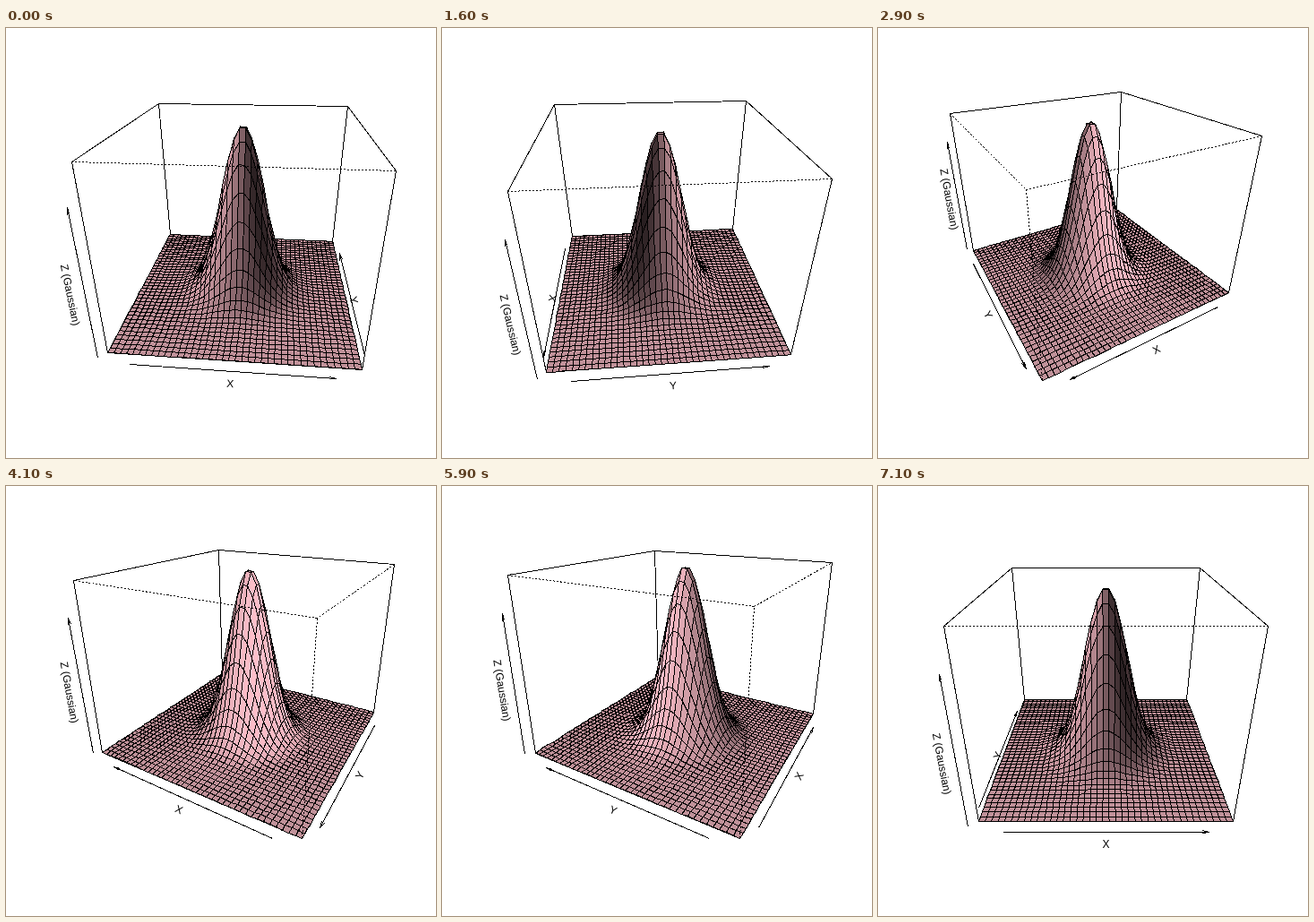
Recreate the animation shown at these times as an HTML page. Size 480 by 480 pixels, loop 7200 ms.

```html
<!DOCTYPE html>
<html lang="en">
<head>
<meta charset="utf-8">
<title>Rotating Gaussian surface</title>
<style>
  html, body { margin: 0; width: 100%; height: 100%; overflow: hidden; background: #fff; }
  svg { display: block; width: 480px; height: 480px; }
  #surface polygon, path { stroke: #000; stroke-width: 1; shape-rendering: crispEdges; }
  path { fill: none; }
  #front { stroke-dasharray: 2 2; }
  text { font: 12px "Liberation Sans", Arial, sans-serif; text-anchor: middle; }
</style>
</head>
<body>
<svg viewBox="0 0 480 480" xmlns="http://www.w3.org/2000/svg">
  <rect width="480" height="480" fill="#fff"/>
  <path id="back"/>
  <path id="axes"/>
  <g id="labels"><text dy="6">X</text><text dy="6">Y</text><text dy="6">Z (Gaussian)</text></g>
  <g id="surface"></g>
  <path id="front"/>
</svg>
<script>
const STEPS = 72, STEP_MS = 100;
const CELLS = 39, SIGMA = 0.2, EXPAND = 0.8, SHADE = 0.4;
const EYE = 2, DIST = Math.sqrt(3) + EYE;
const CENTER = [254.4, 232.8], ROOM = [361.8, 321.8];
const PINK = [255, 192, 203];
const AXIS_SPAN = [[-0.8, 0.8], [-0.8, 0.8], [-1, 0.6265]];
const ARROW_GAP = 0.06, LABEL_GAP = 0.12;
const HEAD = 7.2, HEAD_ANGLE = Math.PI / 18;

const $ = id => document.getElementById(id);
const texts = [...$("labels").children];
const rad = deg => deg * Math.PI / 180;

// Height field, scaled to -1..1
const pos = k => 2 * k / CELLS - 1;
const bell = (x, y) => Math.exp(-(x * x + y * y) / (2 * SIGMA * SIGMA));
const peak = bell(1 / CELLS, 1 / CELLS);
const height = [];
for (let i = 0; i <= CELLS; i++) {
  height.push([]);
  for (let j = 0; j <= CELLS; j++) height[i].push(2 * bell(pos(i), pos(j)) / peak - 1);
}

function facetColor(i, j) {
  const h = 2 / CELLS;
  const a = EXPAND * (height[i + 1][j] - height[i][j + 1]);
  const b = EXPAND * (height[i + 1][j + 1] - height[i][j]);
  const lit = Math.SQRT2 * a / Math.hypot(a + b, a - b, 2 * h);
  const s = Math.pow(Math.max(0, (lit + 1) / 2), SHADE);
  return `rgb(${PINK.map(c => Math.round(c * s))})`;
}

const facets = [];
for (let i = 0; i < CELLS; i++)
  for (let j = 0; j < CELLS; j++) {
    const el = document.createElementNS("http://www.w3.org/2000/svg", "polygon");
    $("surface").appendChild(el);
    facets.push({ i, j, fill: facetColor(i, j), depth: 0 });
  }
const polygons = [...$("surface").children];

const corners = [];
for (const x of [-1, 1]) for (const y of [-1, 1]) for (const z of [-1, 1]) corners.push([x, y, z]);

function makeView(theta, phi) {
  const st = Math.sin(theta), ct = Math.cos(theta);
  const sp = Math.sin(phi), cp = Math.cos(phi);
  const raw = ([x, y, z]) => {
    const across = x * ct + y * st, away = y * ct - x * st, up = z * EXPAND;
    const w = DIST - up * sp + away * cp;
    return [across / w, (up * cp + away * sp) / w];
  };
  const flat = corners.map(raw);
  const range = k => {
    const v = flat.map(p => p[k]);
    return [Math.min(...v), Math.max(...v)];
  };
  const [x0, x1] = range(0), [y0, y1] = range(1);
  const scale = Math.min(ROOM[0] / (x1 - x0), ROOM[1] / (y1 - y0));
  return {
    raw,
    depth: (x, y) => (y * ct - x * st) * cp,
    project: p => {
      const [x, y] = raw(p);
      return [CENTER[0] + scale * (x - (x0 + x1) / 2), CENTER[1] - scale * (y - (y0 + y1) / 2)];
    },
    camera: [DIST * st * cp, -DIST * ct * cp, DIST * sp / EXPAND]
  };
}

const snap = p => p.map(v => Math.floor(v) + 0.5);
const line = (...pts) => "M" + pts.map(p => snap(p).join(" ")).join("L");

function drawBox(view) {
  const faces = (axis, side) => side * view.camera[axis] > 1;
  let back = "", front = "";
  for (let k = 0; k < 3; k++) {
    const m = (k + 1) % 3, n = (k + 2) % 3;
    for (const a of [-1, 1]) for (const b of [-1, 1]) {
      const p = [], q = [];
      p[k] = -1; q[k] = 1;
      p[m] = q[m] = a;
      p[n] = q[n] = b;
      const d = line(view.project(p), view.project(q));
      if (faces(m, a) && faces(n, b)) front += d; else back += d;
    }
  }
  $("back").setAttribute("d", back);
  $("front").setAttribute("d", front);
}

function drawAxis(view, axis, base, out) {
  const at = (value, gap) => {
    const p = base.map((v, k) => v + gap * out[k]);
    p[axis] = value;
    return view.project(p);
  };
  const [lo, hi] = AXIS_SPAN[axis];
  const a = at(lo, ARROW_GAP), b = at(hi, ARROW_GAP);
  const dir = Math.atan2(b[1] - a[1], b[0] - a[0]);
  const barb = turn => [b[0] - HEAD * Math.cos(dir + turn), b[1] - HEAD * Math.sin(dir + turn)];

  const sign = b[0] > a[0] ? 1 : -1;
  const tilt = Math.atan2(sign * (b[1] - a[1]), Math.abs(b[0] - a[0])) * 180 / Math.PI;
  const [x, y] = at((lo + hi) / 2, LABEL_GAP);
  texts[axis].setAttribute("transform",
    `translate(${x.toFixed(2)} ${y.toFixed(2)}) rotate(${tilt.toFixed(2)})`);
  return line(a, b) + line(barb(HEAD_ANGLE), b, barb(-HEAD_ANGLE));
}

function drawAxes(view) {
  const floor = [[-1, -1, -1], [1, -1, -1], [1, 1, -1], [-1, 1, -1]];
  const least = k => floor.reduce((m, p) => view.raw(p)[k] < view.raw(m)[k] ? p : m);
  const [nx, ny] = least(1), [lx, ly] = least(0);
  $("axes").setAttribute("d",
    drawAxis(view, 0, [0, ny, -1], [0, ny, -1]) +
    drawAxis(view, 1, [nx, 0, -1], [nx, 0, -1]) +
    drawAxis(view, 2, [lx, ly, 0], [lx, ly, 0]));
}

function drawSurface(view) {
  const pts = height.map((row, i) =>
    row.map((z, j) => snap(view.project([pos(i), pos(j), z])).join()));
  for (const f of facets) f.depth = view.depth(pos(f.i + 0.5), pos(f.j + 0.5));
  facets.sort((a, b) => b.depth - a.depth);
  facets.forEach(({ i, j, fill }, k) => {
    const el = polygons[k];
    el.setAttribute("points",
      [pts[i][j], pts[i + 1][j], pts[i + 1][j + 1], pts[i][j + 1]].join(" "));
    el.setAttribute("fill", fill);
  });
}

function draw(step) {
  const theta = rad(5 * (step + 1));
  const view = makeView(theta, rad(25 + 5 * Math.sin(theta)));
  drawBox(view);
  drawAxes(view);
  drawSurface(view);
}

let shown = -1;
const start = performance.now();
function tick() {
  const step = Math.floor((performance.now() - start) / STEP_MS) % STEPS;
  if (step !== shown) draw(shown = step);
  requestAnimationFrame(tick);
}
tick();
</script>
</body>
</html>
```
